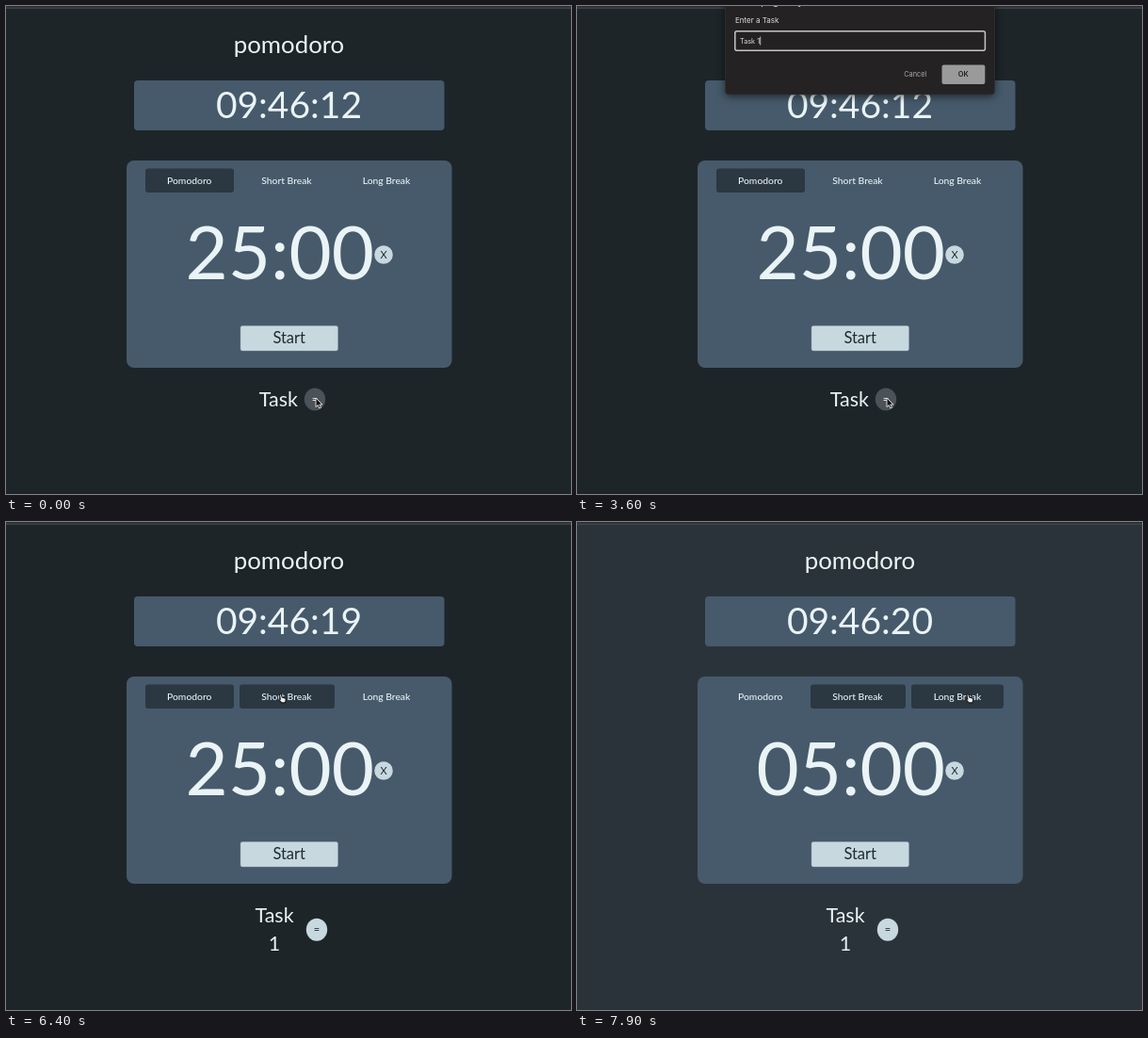
Write an HTML page that moves like this. It is 600 px wide and 518 px high and loops after 8 s.

```html
<!DOCTYPE html>
<html lang="en">
<head>
<meta charset="utf-8">
<title>pomodoro</title>
<style>
  html, body { margin: 0; width: 100%; height: 100%; overflow: hidden; background: #1d2529; }
  svg { display: block; width: 600px; height: 518px; }
  text { font-family: Lato, sans-serif; fill: #eaf3f6; text-anchor: middle; white-space: pre; }
  .panel { fill: #465a6b; }
  .tab { fill: #2b3741; }
  .label { font-size: 10.3px; font-weight: 500; }
  .pale { fill: #c8d8df; }
  .ink { fill: #1f2a31; }
  #dialog text { font-family: Inter, sans-serif; font-size: 7.4px; fill: #dedede; }
  #dialog .left { text-anchor: start; }
  #dialog { filter: drop-shadow(0 2px 4px #0008); }
</style>
</head>
<body>
<svg viewBox="0 0 600 518">
  <rect width="600" height="518" fill="#1d2529"/>
  <rect id="breakShade" width="600" height="518" fill="#2b333a"/>
  <rect width="600" height="2" fill="#282b2f"/>
  <rect y="1.5" width="600" height="1.3" fill="#46494c"/>

  <text x="300.5" y="49.5" font-size="25.8">pomodoro</text>
  <rect class="panel" x="136" y="79" width="329.5" height="53" rx="4"/>
  <text id="clock" x="300.5" y="118.5" font-size="39"></text>

  <rect class="panel" x="128" y="164" width="345.5" height="220" rx="8"/>
  <rect class="tab" id="tabPomodoro" x="148" y="172.5" width="94" height="25.5" rx="3"/>
  <rect class="tab" id="tabShort" x="248" y="172.5" width="101" height="25.5" rx="3"/>
  <rect class="tab" id="tabLong" x="355" y="172.5" width="98" height="25.5" rx="3"/>
  <text class="label" x="194.7" y="188.6">Pomodoro</text>
  <text class="label" x="298" y="188.6">Short Break</text>
  <text class="label" x="404" y="188.6">Long Break</text>

  <text id="timer" x="290.7" y="290" font-size="78"></text>
  <circle class="pale" cx="401" cy="264" r="9.8"/>
  <text class="ink" x="401" y="268" font-size="11">X</text>
  <rect class="pale" x="249" y="339.5" width="103.5" height="26.5" rx="2" stroke="#93a5af" stroke-width=".4"/>
  <text class="ink" x="300.7" y="357.6" font-size="16.5">Start</text>

  <text id="task" y="425" font-size="21.5">Task</text>
  <text id="taskNumber" x="285" y="455" font-size="21.5">1</text>
  <ellipse id="menu"/>
  <text id="menuSign" font-size="11" font-weight="500">=</text>

  <g id="dialog">
    <rect x="157.5" y="-12" width="286" height="106" rx="4" fill="#242223" stroke="#343334" stroke-width=".7"/>
    <text x="246" y="-1" style="font-size:10.5px;text-anchor:end">This page says</text>
    <text class="left" x="168" y="18.4" style="font-size:8px">Enter a Task</text>
    <rect x="167.8" y="26.8" width="265.6" height="20.4" rx="2" fill="#232122" stroke="#c6c6c8" stroke-width="1.5"/>
    <text class="left" id="entry" x="173" y="39.5" style="font-size:7.3px"></text>
    <rect id="caret" y="32.5" width=".8" height="9" fill="#e4e4e4"/>
    <text x="359.3" y="75.3" style="fill:#aaa">Cancel</text>
    <rect x="387.5" y="62.5" width="45.8" height="20.5" rx="2" fill="#9a9a9b"/>
    <text x="410.3" y="75.3" style="fill:#202020;font-weight:600">OK</text>
  </g>

  <path id="arrow" d="M0 0V9.6L2.2 7.6 3.8 11 5.5 10.2 3.9 7H7Z" fill="#111" stroke="#eee" stroke-width=".9"/>
  <path id="hand" d="M0 1Q1-1 2 1L2.7 3.6 5.8 4.4Q7 5 6.7 6.4L6 9.4H2.2L-.6 6.4Q-.6 5.2 .8 5.6Z" fill="#eee" stroke="#15191c" stroke-width="1.1"/>
</svg>
<script>
const LOOP = 8000, STEP = 100;
const $ = id => document.getElementById(id);
const set = (id, attrs) => {
  for (const name in attrs) $(id).setAttribute(name, attrs[name]);
};
const show = (id, opacity) => set(id, { opacity: +opacity });
const ramp = (t, from, to) => Math.min(1, Math.max(0, (t - from) / (to - from)));
const ease = p => p * p * (3 - 2 * p);
const lerp = (a, b, p) => a + (b - a) * p;
const countPassed = (t, times) => times.filter(time => t >= time).length;

const keyTimes = [2100, 2300, 2400, 2500, 2600, 3600];
const tickTimes = [5400, 6400, 7400];

function drawDialog(t) {
  show('dialog', t < 3800 ? ramp(t, 100, 300) : t < 3900 ? .4 : 0);
  $('entry').textContent = 'Task 1'.slice(0, countPassed(t, keyTimes));
  set('caret', { x: 173.2 + $('entry').getComputedTextLength() });
  const hidden = (t >= 700 && t < 1200) || (t >= 1700 && t < 2100) || (t >= 3300 && t < 3600);
  show('caret', !hidden);
}

function drawTask(t) {
  const added = t >= 3900, released = t >= 6400;
  set('task', { x: added ? 285 : 289.3 });
  show('taskNumber', added);
  const grow = added && !released ? ramp(t, 3800, 4100) : 0;
  const cx = added ? 330 : 328, cy = added ? 432.8 : 417.5;
  set('menu', { cx, cy, rx: 11.2 + 2.6 * grow, ry: 12 + 2.8 * grow, fill: released ? '#c8d8df' : '#4b5258' });
  set('menuSign', { x: cx, y: cy + 3.6, class: released ? 'ink' : '' });
}

function drawCursor(t) {
  let x, y;
  if (t < 5800) {
    // sweep out to the right, then back up to the tabs
    const p = ease(ramp(t, 4400, 5300)), q = 1 - p;
    x = q * q * 329 + 2 * q * p * 480 + p * p * 295;
    y = q * q * 416 + 2 * q * p * 330 + p * p * 205;
  } else {
    const up = ease(ramp(t, 5700, 6200)), across = ease(ramp(t, 6900, 7600));
    x = lerp(lerp(295, 290.5, up), 414, across);
    y = lerp(205, 182.5, up);
  }
  const overTab = t > 5800 && y < 198;
  for (const id of ['arrow', 'hand']) {
    set(id, { transform: `translate(${x} ${y})` });
    show(id, (id === 'hand') === overTab);
  }
}

function draw(now) {
  const t = Math.floor(now % LOOP / STEP) * STEP;
  const onBreak = t >= 6500;
  show('breakShade', onBreak);
  $('clock').textContent = '09:46:' + (t < 3900 ? 12 : 17 + countPassed(t, tickTimes));
  $('timer').textContent = onBreak ? '05:00' : '25:00';
  show('tabPomodoro', 1 - ramp(t, 6430, 6600));
  show('tabShort', ramp(t, 5900, 6300));
  show('tabLong', ramp(t, 7200, 7500));
  drawTask(t);
  drawDialog(t);
  drawCursor(t);
}

const start = performance.now();
function frame() {
  draw(performance.now() - start);
  requestAnimationFrame(frame);
}
frame();
</script>
</body>
</html>
```
